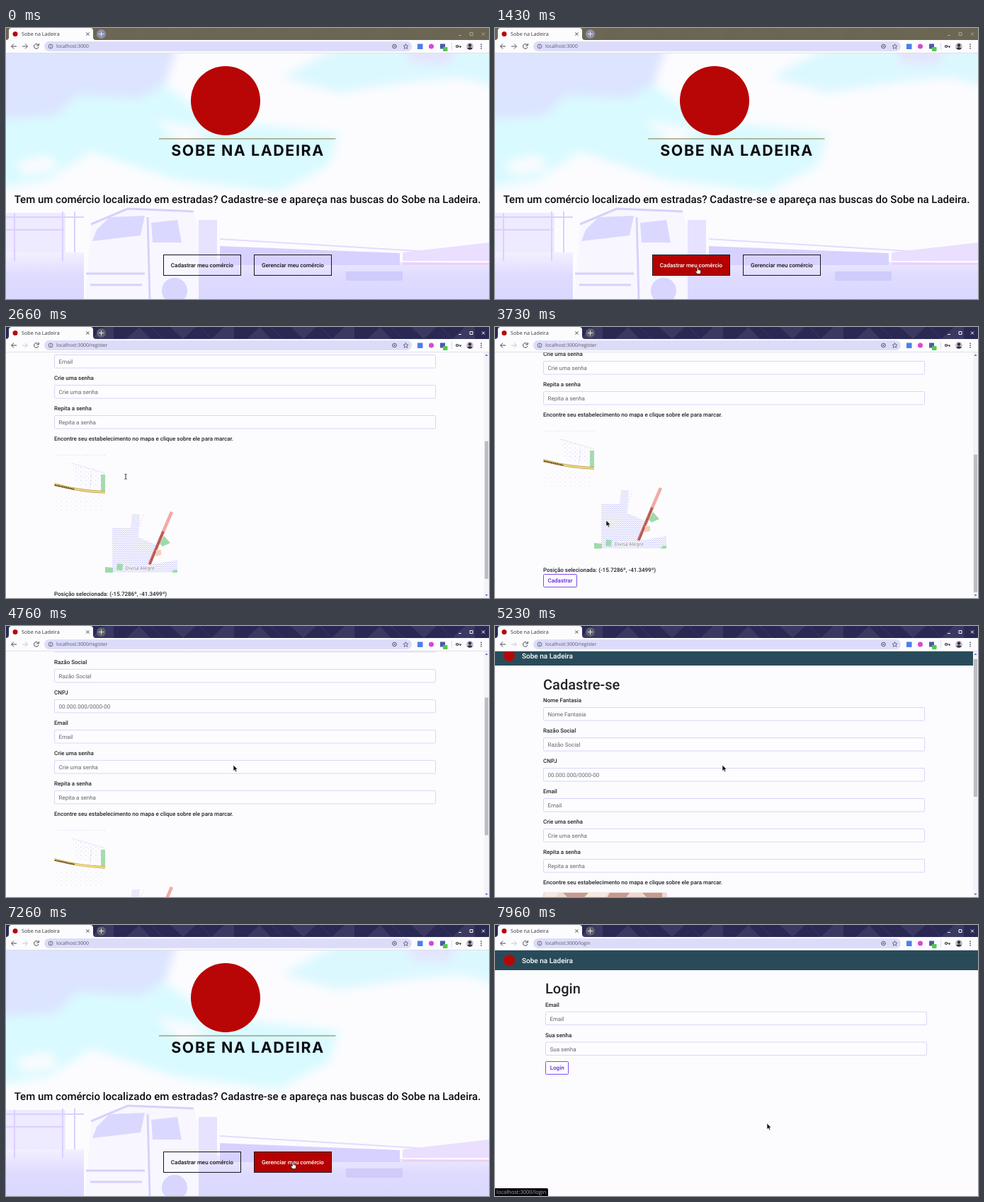
These frames come from a looping animation (682x384 px, 8 s). An HTML page:

```html
<!DOCTYPE html>
<html lang="pt-BR">
<head>
<meta charset="utf-8">
<title>Sobe na Ladeira</title>
<style>
@property --scroll { syntax: "<number>"; inherits: true; initial-value: 0; }
html, body { margin: 0; width: 100%; height: 100%; overflow: hidden; background: #fcfcfe; }
svg.stage { display: block; width: 100%; height: 100%; animation: scroll 8s linear infinite; }
text { font: 500 8px Roboto, sans-serif; fill: #212529; white-space: pre; text-rendering: geometricPrecision; }
.ui { font: 400 6.8px "Open Sans", sans-serif; fill: #55555f; }
.hint { font-weight: 400; fill: #62666f; }
.h1 { font-size: 20px; }
.brand { font-size: 10px; fill: #fff; }
.middle { text-anchor: middle; }
.box { fill: #fdfdff; stroke: #d6d6f8; }
.outline { fill: #fdfdff; stroke: #7a4df0; }
.action { fill: #6420ea; }

.home, .register, .login, .status, .path, .arrow, .beam, .hand, .frame, .facets, .forward, .controls, .plus, .reloaded,
.first rect, .first text, .second rect, .second text { animation: 8s step-end infinite; }
.home { animation-name: home; }
.register { animation-name: register; }
.login { animation-name: login; }
.status { animation-name: status; }
.path.reg { animation-name: regpath; }
.path.log { animation-name: login; }
.frame { animation-name: frame; }
.facets { animation-name: facets; }
.controls { animation-name: controls; }
.plus { animation-name: plus; }
.forward { animation-name: forward; }
.reloaded { animation-name: reloaded; }
.first rect { animation-name: fill1; }
.first text { animation-name: ink1; }
.second rect { animation-name: fill2; }
.second text { animation-name: ink2; }
.arrow { animation-name: arrow; }
.beam { animation-name: beam; }
.hand { animation-name: hand; }
.cursor { animation: move 8s ease-in-out infinite; }
.page { transform: translateY(calc(var(--scroll) * -1px)); }
.thumb { transform: translateY(calc(var(--scroll) * .56px)); }

@keyframes home { 0%, 81% { visibility: visible } 22%, 95% { visibility: hidden } }
@keyframes register { 0%, 81% { visibility: hidden } 22% { visibility: visible } }
@keyframes login { 0% { visibility: hidden } 95% { visibility: visible } }
@keyframes status { 0% { visibility: hidden } 92% { visibility: visible } }
@keyframes regpath { 0%, 84% { visibility: hidden } 22% { visibility: visible } }
@keyframes reloaded { 0% { visibility: hidden } 62% { visibility: visible } }
@keyframes frame { 0% { fill: #6b6653 } 21.2% { fill: #292954 } }
@keyframes facets { 0% { opacity: .15 } 21.2% { opacity: 1 } }
@keyframes controls { 0% { stroke: #a9a698 } 21.2% { stroke: #fff } }
@keyframes plus { 0% { fill: #8f8fae } 21.2% { fill: #62626e } }
@keyframes forward { 0% { stroke: #55555c } 21.2% { stroke: #c6c6cc } }
@keyframes fill1 { 0%, 22% { fill: transparent } 16.5% { fill: #b40000 } }
@keyframes ink1 { 0%, 22% { fill: #111 } 16.5% { fill: #fff } }
@keyframes fill2 { 0%, 95% { fill: transparent } 88.5% { fill: #b40000 } }
@keyframes ink2 { 0%, 95% { fill: #111 } 88.5% { fill: #fff } }
@keyframes arrow {
  0%, 16.5%, 25%, 79%, 88.5% { visibility: hidden }
  8%, 22%, 40%, 81%, 95% { visibility: visible }
}
@keyframes beam { 0%, 40% { visibility: hidden } 25% { visibility: visible } }
@keyframes hand {
  0%, 22%, 81%, 95% { visibility: hidden }
  16.5%, 79%, 88.5% { visibility: visible }
}
@keyframes move {
  0%, 8% { transform: translate(400px, 386px) }
  17%, 22% { transform: translate(286px, 339px) }
  30%, 37% { transform: translate(169px, 212px) }
  43%, 51% { transform: translate(157px, 274px) }
  57%, 69% { transform: translate(321px, 197px) }
  79%, 80.5% { transform: translate(76px, 50px) }
  82%, 83% { transform: translate(102px, 62px) }
  89.5%, 95% { transform: translate(405px, 336px) }
  99%, 100% { transform: translate(384px, 281px) }
}
@keyframes scroll {
  0%, 25% { --scroll: 0 }
  32%, 36% { --scroll: 213 }
  39%, 53% { --scroll: 247 }
  62.5% { --scroll: 40 }
  65.2%, 66% { --scroll: 8 }
  68%, 100% { --scroll: 0 }
}
</style>
</head>
<body>
<svg class="stage" viewBox="0 0 682 384" preserveAspectRatio="none">
  <defs>
    <pattern id="facets" width="170" height="17" patternUnits="userSpaceOnUse">
      <path d="M0 17L18 0L34 17ZM62 0H98L80 17ZM120 17L138 0H152V17Z" fill="#fff" opacity=".08"/>
      <path d="M34 0L52 17M104 0L120 17" stroke="#b8a8e8" stroke-width=".6" opacity=".2"/>
    </pattern>
    <pattern id="blocks" width="3" height="3" patternUnits="userSpaceOnUse">
      <path d="M0 .5h1.5M1.5 2h1.5" stroke="#c3c3fa"/>
    </pattern>
    <pattern id="sparse" width="7" height="6" patternUnits="userSpaceOnUse">
      <path d="M0 1l2 .6M4 4l1 .3" stroke="#d0d0fa" stroke-width=".8"/>
    </pattern>
    <linearGradient id="ground" x2="0" y2="1">
      <stop offset="0" stop-color="#f3f0ff"/>
      <stop offset=".5" stop-color="#dfdbff"/>
      <stop offset="1" stop-color="#dad8ff"/>
    </linearGradient>
    <filter id="soft" x="-20%" y="-20%" width="140%" height="140%"><feGaussianBlur stdDeviation="7"/></filter>
    <clipPath id="view"><rect y="36" width="682" height="348"/></clipPath>
  </defs>

  <rect width="682" height="384" fill="#fcfcfe"/>

  <g class="home" clip-path="url(#view)">
    <rect y="36" width="682" height="348" fill="#fcfcff"/>
    <g filter="url(#soft)">
      <path d="M-20 80L210 70L290 130L470 150L455 195L385 232L240 215L120 175L60 215L-20 228Z" fill="#d9faff"/>
      <path d="M-20 16H245L225 78L190 100L100 95L70 125L-20 130Z" fill="#dce4ff"/>
      <path d="M390 70L480 20H700V85L640 70L560 78L470 92Z" fill="#dcf8ff"/>
      <path d="M560 20H640L625 52L575 50Z" fill="#e4e4ff"/>
      <path d="M15 190L60 180L75 200L25 208ZM210 130L290 145L250 165Z" fill="#fcfcff"/>
    </g>
    <path d="M0 318H110V384H0ZM270 326L682 334V384H270Z" fill="url(#ground)"/>
    <path d="M0 262H84V318H0Z" fill="#eeeaff"/>
    <path d="M0 268H110M0 286H82M12 262V330M80 260V330M97 260V318" fill="none" stroke="#dccfff" stroke-width="2"/>
    <path d="M120 278L172 256L265 260L272 286V384H112Z" fill="#f8f7ff"/>
    <path d="M128 286L146 268L196 266L190 294L122 302ZM205 276L242 272L248 304H207Z" fill="#dbd8ff"/>
    <path d="M120 278L172 256L265 260M200 268L203 384M113 348H196M119 364H192" fill="none" stroke="#d6d2fb" stroke-width="3"/>
    <path d="M272 272H298V340H272Z" fill="#e6e2ff"/>
    <path d="M302 309L556 319V336H302Z" fill="#d7d1ff"/>
    <path d="M302 299L682 322" stroke="#e3dbff" stroke-width="2"/>
    <path d="M560 318L682 304V330H560Z" fill="#eadfff"/>
    <path d="M560 334H682" stroke="#f0cdf8" stroke-width="3"/>
    <circle cx="238" cy="372" r="18" fill="#d8d5ff"/>
    <path d="M480 345H560V358H480Z" fill="#cfcbfa"/>

    <circle cx="310" cy="103" r="49" fill="#b80505"/>
    <path d="M216 157H465.500" stroke="#85743a"/>
    <text class="middle" x="341.500" y="181" style="font:700 21.4px Inter,sans-serif;letter-spacing:1.6px;fill:#0b0b12">SOBE NA LADEIRA</text>
    <text class="middle" x="341" y="248" style="font-size:15px;fill:#0b0b12">Tem um comércio localizado em estradas? Cadastre-se e apareça nas buscas do Sobe na Ladeira.</text>
    <g class="first"><rect x="222.500" y="321.500" width="109" height="29" stroke="#15151c"/><text class="middle" x="277" y="339">Cadastrar meu comércio</text></g>
    <g class="second"><rect x="350.500" y="321.500" width="109" height="29" stroke="#15151c"/><text class="middle" x="405" y="339">Gerenciar meu comércio</text></g>
  </g>

  <g class="register" clip-path="url(#view)">
    <g class="page">
      <rect y="36" width="675" height="28" fill="#294b59"/>
      <circle cx="20" cy="50" r="8" fill="#b40808"/>
      <text class="brand" x="38" y="53.500">Sobe na Ladeira</text>
      <text class="h1" x="68" y="98">Cadastre-se</text>
      <g id="fields"></g>
      <text x="68" y="374">Encontre seu estabelecimento no mapa e clique sobre ele para marcar.</text>
      <g transform="translate(0 213)">
        <path d="M70 181.500H140" stroke="#e0e0fa" stroke-dasharray="2 2"/>
        <path d="M92 193L134 205V228L100 222Z" fill="url(#sparse)"/>
        <path d="M68 236H140V260H68Z" fill="url(#sparse)" opacity=".6"/>
        <path d="M93 193L140 207M121 208L118 230" stroke="#c9c9f5" stroke-width=".7" stroke-dasharray="2 1"/>
        <path d="M134 209H140V234H134Z" fill="#a5dbae"/>
        <path d="M68 223Q105 233 140 234" fill="none" stroke="#b59a48" stroke-width="3.500"/>
        <path d="M68 223Q105 233 140 234" fill="none" stroke="#f6db7c" stroke-width="2.200"/>
        <path d="M69 224L97 230" stroke="#5d4a2c" stroke-width="2" stroke-dasharray="2 .6"/>
        <path d="M150 285H176L178 265H189L187 298L213 309L203 337L242 330V348H150Z" fill="url(#blocks)"/>
        <path d="M194 266L187 284" stroke="#f0b8c8" stroke-dasharray="1 3"/>
        <path d="M234 262L222 290L202 337" fill="none" stroke="#f3aaa6" stroke-width="4.500"/>
        <path d="M222 290L203 336" stroke="#a34a42" stroke-width="3.500" stroke-dasharray="2 .5"/>
        <path d="M223 296L232 306L221 311L217 307Z" fill="#a0d9ab"/>
        <path d="M212 316H219V323L211 325Z" fill="#f6cdb7"/>
        <path d="M140 340L151 341V348H140ZM157 335L165 336L164 345L156 344ZM237 344H242V348H234Z" fill="#a0d9ab"/>
        <text x="168.500" y="344" style="font:400 6.800px 'Noto Sans',sans-serif;fill:#777;stroke:#fff;stroke-width:1.500px;paint-order:stroke">Divisa Alegre</text>
      </g>
      <g class="reloaded">
        <rect x="68" y="385.500" width="175" height="9" rx="2" fill="#efd8d4"/>
        <path d="M96 386H132L124 394H104ZM162 386H190L184 394H158ZM208 386H236V394H216Z" fill="#c79a90"/>
        <path d="M132 386H160L154 394H126ZM70 386H90L84 394H70Z" fill="#f8e9df"/>
      </g>
      <text x="68" y="594">Posição selecionada: (-15.7286º, -41.3499º)</text>
      <rect class="outline" x="68.500" y="597.500" width="47" height="18" rx="1"/>
      <text class="action middle" x="92" y="609">Cadastrar</text>
    </g>
    <rect x="675" y="36" width="7" height="348" fill="#f2f2f8"/>
    <rect class="thumb" x="676" y="42.500" width="5" height="195" fill="#bcbcc2"/>
    <path d="M676.500 41L678.500 38.500L680.500 41ZM676.500 379L678.500 381.500L680.500 379Z" fill="#6262d8"/>
  </g>

  <g class="login">
    <rect y="36" width="682" height="28" fill="#294b59"/>
    <circle cx="20" cy="50" r="8" fill="#b40808"/>
    <text class="brand" x="38" y="53.500">Sobe na Ladeira</text>
    <text class="h1" x="71" y="97">Login</text>
    <g id="access"></g>
    <rect class="outline" x="71.500" y="193.500" width="32" height="18" rx="1"/>
    <text class="action middle" x="87.700" y="205">Login</text>
  </g>

  <g class="status">
    <path d="M0 373H73Q75 373 75 375V384H0Z" fill="#08080c"/>
    <text class="ui" x="2" y="381" style="font-size:7.500px;fill:#a2a2aa">localhost:3000/login</text>
  </g>

  <g class="chrome" fill="none">
    <rect class="frame" width="682" height="18"/>
    <rect class="facets" width="682" height="17" fill="url(#facets)"/>
    <path d="M0 17Q4 17 4 13V4Q4 0 8 0H119Q123 0 123 4V13Q123 17 127 17H682V36H0Z" fill="#fcfcfe"/>
    <path d="M0 35.500H682" stroke="#dfdfe8"/>
    <circle cx="13" cy="8.500" r="3.500" fill="#b40808"/>
    <text class="ui" x="22" y="11" style="font-size:7.200px;fill:#33333b">Sobe na Ladeira</text>
    <path d="M113.500 6.500L117.500 10.500M117.500 6.500L113.500 10.500" stroke="#33333b"/>
    <circle class="plus" cx="134.500" cy="8.500" r="6.500"/>
    <path d="M131 8.500H138M134.500 5V12" stroke="#e4e4ee"/>
    <path class="controls" d="M639 10.500H643M655 6.500H659V10.500H655ZM672 6.500L676 10.500M676 6.500L672 10.500"/>
    <path d="M15 26H8M11 22.500L7.500 26L11 29.500" stroke="#44444c"/>
    <path class="forward" d="M23 26H30M27 22.500L30.500 26L27 29.500"/>
    <path d="M45.500 24A3.300 3.300 0 1 0 46 27M46.300 22V25H43.300" stroke="#44444c"/>
    <rect x="54" y="19" width="519" height="14" rx="7" fill="#dcdcfa"/>
    <circle cx="63" cy="26" r="3" stroke="#55555f" stroke-width=".8"/>
    <path d="M63 25.500V28M63 24V24.800" stroke="#55555f" stroke-width=".8"/>
    <text class="ui" x="71" y="28.300">localhost:3000</text>
    <text class="ui path reg" x="116.800" y="28.300">/register</text>
    <text class="ui path log" x="116.800" y="28.300">/login</text>
    <circle cx="548.500" cy="26" r="2.800" stroke="#55555f"/><circle cx="548.500" cy="26" r="1" fill="#55555f"/>
    <path d="M564.500 22.600L565.500 25L568 25.200L566.100 26.900L566.700 29.400L564.500 28L562.300 29.400L562.900 26.900L561 25.200L563.500 25Z" stroke="#55555f" stroke-width=".8"/>
    <rect x="581" y="22.500" width="7.500" height="7.500" fill="#4c7eea"/>
    <circle cx="600.500" cy="26" r="3.500" fill="#d747d1"/>
    <rect x="613" y="22.500" width="7" height="7" fill="#4b5ba8"/>
    <rect x="617" y="27" width="6.500" height="6" rx="1" fill="#55c84d"/>
    <path d="M629.500 21V31" stroke="#dadaf0"/>
    <circle cx="637" cy="26" r="1.500" stroke="#34343c" stroke-width="1.200"/>
    <path d="M638.500 26H643M641.500 26V28" stroke="#34343c" stroke-width="1.200"/>
    <circle cx="655" cy="26" r="5" fill="#c8bec8"/>
    <path d="M651 29Q655 25.500 659 29Q655 32.500 651 29Z" fill="#343048"/><circle cx="655" cy="24.500" r="2.300" fill="#343048"/>
    <path d="M671 22.500V24M671 25.300V26.800M671 28.100V29.600" stroke="#44444c" stroke-width="1.500"/>
  </g>

  <g class="cursor">
    <path class="arrow" d="M0 0V8.500L2 6.800L3.400 9.700L4.900 9L3.500 6.200L6 6Z" fill="#111" stroke="#fff" stroke-width=".6"/>
    <path class="beam" d="M-1.500 -3.500Q0 -3.500 0 -2.500Q0 -3.500 1.500 -3.500M0 -2.500V2.500M-1.500 3.500Q0 3.500 0 2.500Q0 3.500 1.500 3.500" fill="none" stroke="#33333a"/>
    <path class="hand" d="M-.8 0Q.4 -1 1 0V3.500L4.200 4.300Q5 4.800 4.700 6L4 9.500H-.5L-3 6Q-3 4.800 -2 5L-.8 6Z" fill="#fff" stroke="#111" stroke-width=".7"/>
  </g>
</svg>
<script>
// Each field is a label above a box holding its hint.
const field = (x, y, label, hint = label) => `
  <text x="${x}" y="${y}">${label}</text>
  <rect class="box" x="${x + .5}" y="${y + 7.5}" width="538" height="18.5" rx="1.5"/>
  <text class="hint" x="${x + 6.5}" y="${y + 20}">${hint}</text>`;

const fill = (id, x, top, rows) => {
  document.getElementById(id).innerHTML =
    rows.map((row, i) => field(x, top + 43 * i, ...row)).join("");
};

fill("fields", 68, 116, [
  ["Nome Fantasia"], ["Razão Social"], ["CNPJ", "00.000.000/0000-00"],
  ["Email"], ["Crie uma senha"], ["Repita a senha"]
]);
fill("access", 71, 115.5, [["Email"], ["Sua senha"]]);
</script>
</body>
</html>
```
